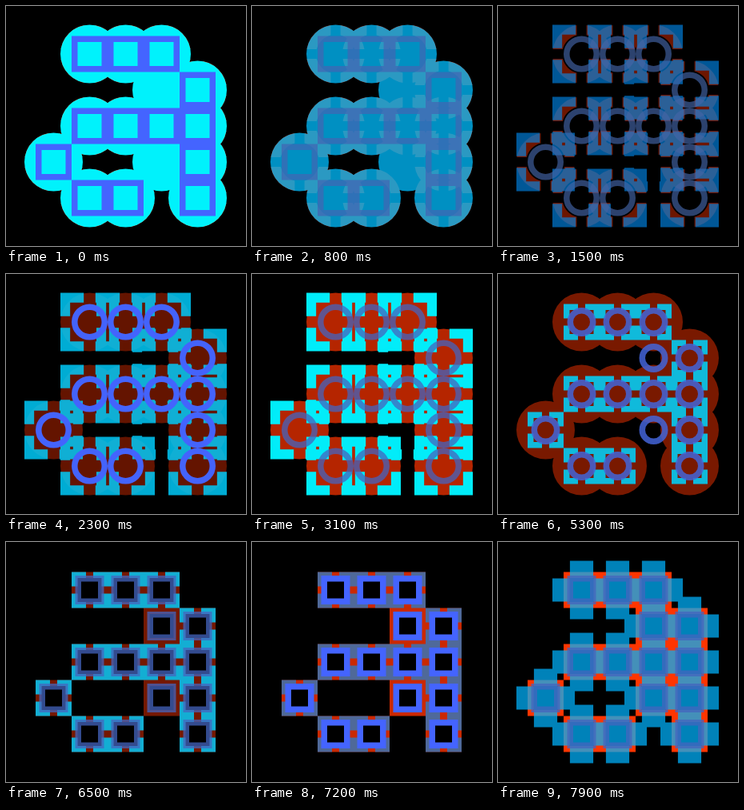
Animation of 300 by 300 pixels, one loop 8 s. Source, as an HTML page with a canvas:

```html
<!DOCTYPE html>
<html lang="en">
<head>
<meta charset="utf-8">
<title>Layered modular letter</title>
<style>
html, body { margin: 0; width: 100%; height: 100%; overflow: hidden; background: #000; }
canvas { display: block; width: 100vw; height: 100vh; }
</style>
</head>
<body>
<canvas id="stage" width="300" height="300"></canvas>
<script>
const ctx = document.getElementById('stage').getContext('2d');
const LOOP = 8000, STEP = 100, LINE = 7.5;
const BIG = 73, MID = 45, SMALL = 36;

// The letter on a 5 x 5 grid; "+" marks modules only some styles use.
const cells = [];
['.###.', '...+#', '.####', '#..+#', '.##.#'].forEach((row, j) =>
  [...row].forEach((mark, i) => {
    if (mark !== '.') cells.push({ x: 59.5 + 45 * i, y: 60 + 45 * j, extra: mark === '+' });
  }));

const box = (x, y, w, h) => ctx.rect(x - w / 2, y - h / 2, w, h);
const circle = (x, y, r) => { ctx.moveTo(x + r, y); ctx.arc(x, y, r, 0, 7); };

const disc = size => ({ add: (x, y) => circle(x, y, size / 2) });
const ring = size => ({ line: true, add: (x, y) => circle(x, y, (size - LINE) / 2) });
const frame = size => ({ line: true, add: (x, y) => box(x, y, size - LINE, size - LINE) });
const plus = size => ({
  add(x, y) {
    box(x, y, size, size * 0.4);
    box(x, y, size * 0.4, size);
  }
});
const brackets = size => ({
  add(x, y) {
    const long = size * 0.4, thick = size / 6;
    const far = (size - thick) / 2, near = (size - long) / 2;
    for (const sx of [-1, 1]) for (const sy of [-1, 1]) {
      box(x + sx * near, y + sy * far, long, thick);
      box(x + sx * far, y + sy * near, thick, long);
    }
  }
});
// A thick ring cut by a cross
const arcs = size => ({
  add(x, y) {
    const outer = size / 2, inner = size / 3, half = size / 12;
    const a = Math.asin(half / outer), b = Math.asin(half / inner);
    for (let q = 0; q < 4; q++) {
      const from = q * Math.PI / 2, to = from + Math.PI / 2;
      ctx.moveTo(x + outer * Math.cos(from + a), y + outer * Math.sin(from + a));
      ctx.arc(x, y, outer, from + a, to - a);
      ctx.arc(x, y, inner, to - b, from + b, true);
      ctx.closePath();
    }
  }
});
const full = style => ({ ...style, extra: true });

// Each layer pulses with its own period and takes its next style when faintest.
const layers = [
  {
    color: a => `rgb(${255 * a},${53 * a},0)`, period: 3950,
    styles: [arcs(BIG), disc(BIG), full(frame(MID))]
  },
  {
    color: a => `rgb(0,${242 * a},252)`, period: 2930,
    styles: [full(disc(BIG)), full(brackets(BIG)), brackets(MID), full(plus(BIG))]
  },
  {
    color: a => `rgb(68,100,${255 * a})`, period: 2400,
    styles: [frame(MID), ring(MID), full(ring(SMALL)), full(frame(SMALL))]
  }
];

function drawLayer({ color, period, styles }, t) {
  const turns = t / period;
  const alpha = 0.8 + 0.2 * Math.cos(2 * Math.PI * turns);
  const style = styles[Math.round(turns)];

  ctx.globalAlpha = alpha;
  ctx.fillStyle = ctx.strokeStyle = color(alpha);
  ctx.beginPath();
  for (const { x, y, extra } of cells) if (!extra || style.extra) style.add(x, y);
  if (style.line) ctx.stroke(); else ctx.fill();
}

function draw(now) {
  const t = Math.floor(now % LOOP / STEP) * STEP;
  ctx.globalAlpha = 1;
  ctx.fillStyle = '#000';
  ctx.fillRect(0, 0, 300, 300);
  ctx.lineWidth = LINE;
  layers.forEach(layer => drawLayer(layer, t));
}

const start = performance.now();
function tick() {
  draw(performance.now() - start);
  requestAnimationFrame(tick);
}
tick();
</script>
</body>
</html>
```
